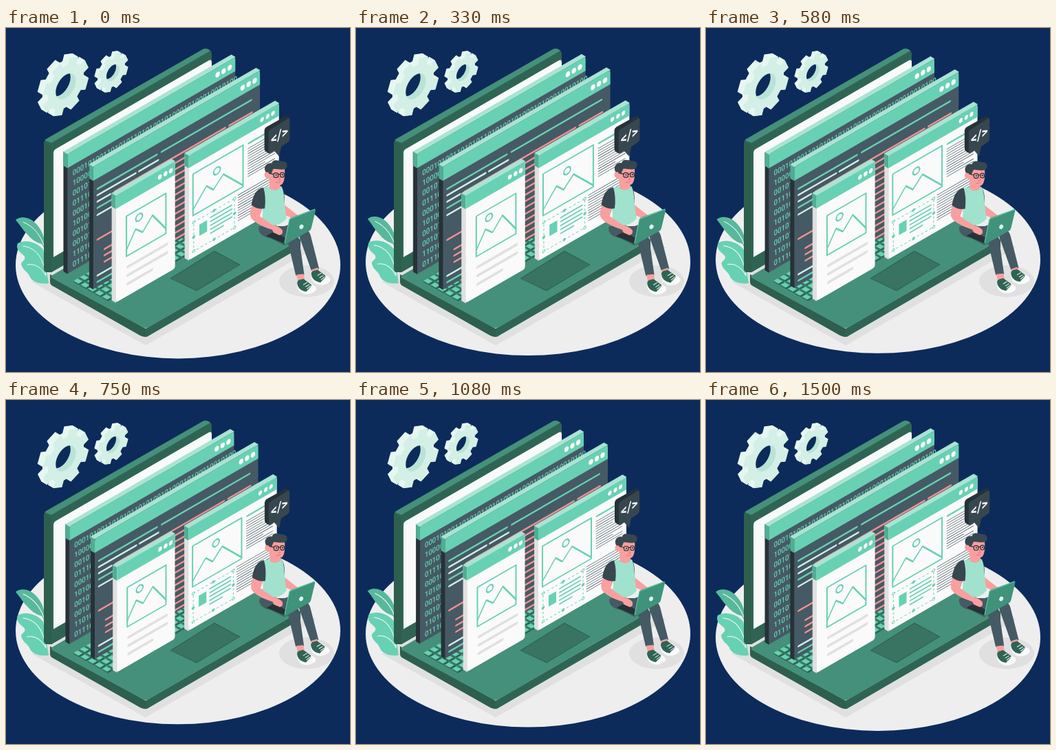
Animation, 500 px wide and 500 px high, one loop 1.54 s. Source, as an HTML page with a canvas:

```html
<!DOCTYPE html>
<html lang="en">
<head>
<meta charset="utf-8">
<title>Developer workspace</title>
<style>
html, body { margin: 0; width: 100%; height: 100%; overflow: hidden; background: #0c2b5b; }
canvas { display: block; width: 100vmin; height: 100vmin; }
</style>
</head>
<body>
<canvas id="stage"></canvas>
<script>
const canvas = document.getElementById('stage');
const ctx = canvas.getContext('2d');
const density = Math.max(1, window.devicePixelRatio || 1);
canvas.width = canvas.height = 500 * density;

const LOOP = 1540;
const SLOPE = 0.577;
const NAVY = '#0c2b5b', MINT = '#68d1b3', PALE = '#a9e4d3', WHITE = '#fafafa';
const SLATE = '#455a64', DARK = '#37474f', INK = '#263238', PINK = '#f4918f', SKIN = '#f99f9f';
const GREEN = '#45907a', GREEN_MID = '#397462', GREEN_DARK = '#2f6454', GREEN_DEEP = '#2d5e4e';
const GREY = '#e0e0e0';

// [time, scale] of the double beat shared by windows, person and bubble
const BEAT = [[0, 1.024], [100, 1.03], [190, 1.09], [260, 1.03], [330, 1.028], [580, 1.01],
  [880, 1], [970, 1.08], [1050, 1], [1250, 1], [1500, 1.01], [LOOP, 1.024]];

function beatAt(t) {
  const i = BEAT.findIndex(([time]) => time > t);
  const [t0, a] = BEAT[i - 1], [t1, b] = BEAT[i];
  return a + (b - a) * (t - t0) / (t1 - t0);
}

function poly(color, ...pts) {
  ctx.beginPath();
  pts.forEach(([x, y]) => ctx.lineTo(x, y));
  ctx.closePath();
  ctx.fillStyle = ctx.strokeStyle = color;
  ctx.lineWidth = 0.8;
  ctx.lineJoin = 'round';
  ctx.fill();
  ctx.stroke();
}

function shape(color, d) {
  ctx.fillStyle = color;
  ctx.fill(new Path2D(d));
}

function stroke(color, width, d) {
  ctx.strokeStyle = color;
  ctx.lineWidth = width;
  ctx.lineCap = ctx.lineJoin = 'round';
  ctx.stroke(new Path2D(d));
}

function oval(color, x, y, rx, ry, turn = 0) {
  ctx.beginPath();
  ctx.ellipse(x, y, rx, ry, turn, 0, Math.PI * 2);
  ctx.fillStyle = color;
  ctx.fill();
}

function bar(color, width, u0, u1, v) {
  stroke(color, width, `M${u0} ${v}H${u1}`);
}

function scaled(x, y, s, draw) {
  ctx.save();
  ctx.translate(x, y);
  ctx.scale(s, s);
  ctx.translate(-x, -y);
  draw();
  ctx.restore();
}

function drawFloor(t) {
  const phase = ((t + 45) % LOOP) / LOOP;
  const lift = 10 * (1 - Math.abs(2 * phase - 1));
  oval('#eeeeee', 250, 345 - lift, 236, 136);
  poly(GREY, [38, 369], [203, 461], [450, 319], [290, 229]);
  oval(GREY, 437, 368, 40, 23);
}

function drawPlant(t) {
  const sway = (1 - Math.cos(4 * Math.PI * t / LOOP)) / 2;
  ctx.save();
  ctx.translate(60, 365);
  ctx.rotate(sway * 0.035);
  ctx.translate(-60, -365);
  shape('#58b89c', 'M14 279C22 272 36 275 45 286C53 295 57 306 58 324L52 314C42 311 36 306 31 300C24 293 21 287 14 279Z');
  stroke(WHITE, 1, 'M25 282C41 289 51 301 57 322');
  shape(MINT, 'M17 313C27 307 44 310 54 322L62 371C49 373 37 369 34 360C31 354 24 352 22 343C23 338 29 338 27 332C23 327 13 323 17 313Z');
  stroke(WHITE, 1, 'M25 317C43 319 54 333 58 359M31 344C43 342 51 348 58 360');
  ctx.restore();
}

function gearPath(x, y, r) {
  ctx.beginPath();
  for (let k = 0; k < 8; k++) {
    const mid = (24 + 45 * k) * Math.PI / 180;
    [[-0.25, 0.78], [-0.2, 1], [0.2, 1], [0.25, 0.78]].forEach(([da, f]) => {
      const c = Math.cos(mid + da), s = Math.sin(mid + da);
      ctx.lineTo(x + 0.866 * r * f * c, y - r * f * (s + 0.5 * c));
    });
  }
  ctx.closePath();
}

function ringPath(x, y, r) {
  ctx.beginPath();
  for (let i = 0; i < 48; i++) {
    const a = i * Math.PI / 24;
    ctx.lineTo(x + 0.866 * r * Math.cos(a), y - r * (Math.sin(a) + 0.5 * Math.cos(a)));
  }
  ctx.closePath();
}

function drawGear(x, y, r, hole, depth) {
  for (let d = depth; d >= 0; d -= 0.5) {
    gearPath(x - d, y - d * 0.6, r);
    ctx.fillStyle = d ? '#e6f7f2' : '#d3efe6';
    ctx.fill();
  }
  ctx.save();
  ringPath(x, y, hole);
  ctx.clip();
  ctx.fillStyle = '#b9e3d7';
  ctx.fill();
  ringPath(x - depth, y - depth * 0.6, hole);
  ctx.fillStyle = NAVY;
  ctx.fill();
  ctx.restore();
}

function drawComputer() {
  // lid
  shape(GREEN_DARK, 'M55 170Q55 163 60 160L286 31Q291 28 296 32Q299 34 299 39V220L66 355L58 355Q55 353 55 349Z');
  shape(GREEN, 'M56 163L286 31Q291 28 297 33L66 167Z');
  shape(GREEN_DARK, 'M66 169L299 36V220L66 355Z');
  shape(GREEN_DEEP, 'M55 165L64 170Q66 171 66 174V355L57 354Q55 352 55 348Z');
  shape('#f8faf9', 'M69 182Q69 178 72 176L295 47Q299 45 299 50V200L69 333Z');

  // base
  shape(GREEN_DEEP, 'M64 358L203 437V449Q199 449 195 447L68 375Q64 373 64 369Z');
  shape(GREEN_DARK, 'M203 437L428 307V319L208 447Q206 449 203 449Z');
  shape(GREEN, 'M66 360L290 229L428 307L209 434Q203 438 197 434L66 363Z');

  const at = (a, b) => [64 + 139 * a + 225 * b, 360 + 77 * a - 130 * b];
  for (let row = 0; row < 5; row++) {
    for (let col = 0; col < 22; col++) {
      const a = 0.18 + row * 0.075, b = 0.04 + col * 0.04;
      poly(GREEN_DARK, at(a, b), at(a + 0.062, b), at(a + 0.062, b + 0.033), at(a, b + 0.033));
      poly(MINT, at(a - 0.004, b + 0.006), at(a + 0.043, b + 0.006), at(a + 0.043, b + 0.03), at(a - 0.004, b + 0.03));
    }
  }
  poly(GREEN_DARK, [239, 364], [303, 324], [340, 344], [277, 382]);
  poly(GREEN_MID, [241, 364.3], [303, 325.6], [338, 344.3], [277, 380.4]);
}

function drawWindow({ x, y, w, h, head, body, side, dots, content }) {
  const dx = -5.5, dy = -3.3, rise = w * SLOPE;
  poly(side, [x + dx, y + dy], [x, y], [x, y + h], [x + dx, y + h + dy]);
  poly('#4fae93', [x + dx, y + dy], [x, y], [x, y + head], [x + dx, y + head + dy]);
  poly(PALE, [x + dx, y + dy], [x + w + dx, y - rise + dy], [x + w, y - rise], [x, y]);

  ctx.save();
  ctx.transform(1, -SLOPE, 0, 1, x, y);
  ctx.fillStyle = body;
  ctx.beginPath();
  ctx.roundRect(0, 0, w, h, 3);
  ctx.fill();
  ctx.fillStyle = MINT;
  ctx.beginPath();
  ctx.roundRect(0, 0, w, head, [3, 3, 0, 0]);
  ctx.fill();
  dots.u.forEach(u => oval(WHITE, u, head / 2 + 0.3, dots.r, dots.r * 1.2));
  content();
  ctx.restore();
}

function picture(u, v, w, h, sun, hills) {
  ctx.strokeStyle = MINT;
  ctx.lineWidth = 2;
  ctx.strokeRect(u, v, w, h);
  ctx.beginPath();
  ctx.arc(sun[0], sun[1], 4.8, 0, Math.PI * 2);
  ctx.stroke();
  stroke(MINT, 2, 'M' + hills.map(p => p.join(' ')).join('L'));
}

function binaryContent() {
  const rows = ['0001010011010101101010010100010100010010100111010101', '10000101', '00101001',
    '01110100', '00010110', '10100101', '00101101', '00101001', '11010010', '01110101'];
  ctx.save();
  ctx.scale(0.87, 1);
  ctx.font = '500 11px Roboto, "Liberation Sans", sans-serif';
  ctx.textBaseline = 'middle';
  ctx.fillStyle = MINT;
  rows.forEach((row, i) => ctx.fillText(row.slice(0, 43), 8, 32 + i * 14.4));
  ctx.restore();
}

function codeContent() {
  const pale = '#d3f0e8';
  const lines = [
    [35, 6, 90, MINT], [35, 97, 224, MINT], [44, 6, 60, pale], [44, 65, 92, pale],
    [53, 6, 24, pale], [53, 30, 187, PINK], [53, 193, 225, PINK], [62, 6, 40, MINT],
    [72, 6, 40, pale], [107, 6, 40, PINK], [126, 16, 40, PINK], [135, 16, 40, PINK],
    [144, 16, 40, PINK], [158, 6, 40, pale], [167, 6, 40, MINT]];
  lines.forEach(([v, u0, u1, color]) => bar(color, 2.7, u0, u1, v));
  for (let v = 62; v < 172; v += 9) bar(PINK, 2.7, 105, 150, v);
}

function cardContent() {
  picture(15, 38, 56, 57, [33, 50], [[15, 86], [28, 64], [38, 74], [52, 58], [71, 88]]);
  bar(GREY, 4, 17, 72, 111);
  bar(GREY, 4, 17, 72, 123);
  bar(GREY, 4, 17, 51, 135);
}

function pageContent() {
  picture(6, 30, 71, 59, [40, 45], [[6, 81], [25, 58], [35, 69], [49, 55], [77, 87]]);
  bar(MINT, 2.6, 85, 110, 32);
  for (let i = 0; i < 12; i++) bar(SLATE, 0.8, 84, i % 5 === 4 ? 108 : 122, 39 + i * 3.6);
  for (let i = 0; i < 11; i++) bar(SLATE, 0.8, 70, i % 6 === 5 ? 92 : 122, 97 + i * 3.6);
  ctx.setLineDash([3, 3]);
  ctx.lineWidth = 1;
  ctx.lineCap = 'butt';
  ctx.strokeStyle = MINT;
  ctx.strokeRect(7, 99, 58, 41);
  ctx.setLineDash([]);
  [[7, 99], [65, 99], [7, 140], [65, 140], [36, 99], [36, 140], [7, 120], [65, 120]].forEach(([u, v], i) => {
    oval(MINT, u, v, 2.2, 2.2);
    if (i < 4) oval(WHITE, u, v, 1.2, 1.2);
  });
  ctx.fillStyle = MINT;
  ctx.fillRect(15, 107, 11, 16);
  for (let i = 0; i < 5; i++) bar(MINT, 1.9, 31, i === 4 ? 49 : 61, 106 + i * 5.6);
}

const WINDOWS = [
  { x: 93, y: 184, w: 238, h: 170, head: 20, body: SLATE, side: INK,
    dots: { u: [213, 221.5, 230], r: 3.2 }, content: binaryContent },
  { x: 129.5, y: 202, w: 236.5, h: 174, head: 20, body: SLATE, side: INK,
    dots: { u: [212, 220.5, 229], r: 3.2 }, content: codeContent },
  { x: 265, y: 186, w: 128, h: 149, head: 18, body: WHITE, side: GREY,
    dots: { u: [104, 112, 119.5], r: 2.7 }, content: pageContent },
  { x: 161.5, y: 243, w: 84, h: 152, head: 19, body: WHITE, side: GREY,
    dots: { u: [62.5, 70.5, 78], r: 2.8 }, content: cardContent }
];

function drawShoe(x, y) {
  ctx.save();
  ctx.translate(x, y);
  shape(WHITE, 'M0 7C-1 14 3 19 9 21C15 23 25 20 27 15C28 10 20 8 15 4Z');
  shape(GREEN_DARK, 'M0 5C1 1 4 1 9 0L20 8C21 11 17 13 13 18C5 17 0 12 0 5Z');
  stroke(WHITE, 1, 'M9 8L14 5M12 11L17 8M14 14L19 10');
  ctx.restore();
}

function drawPerson() {
  // legs
  shape(SLATE, 'M369 288C366 297 374 304 386 305L409 307L421 358Q428 361 433 357L426 308Q424 296 408 288Z');
  shape(SLATE, 'M400 290L426 303L443 351Q448 353 454 348L442 301Q437 287 416 284Z');
  stroke(DARK, 0.8, 'M425 308Q420 300 406 298');
  shape(SKIN, 'M422 357L424 367L434 365L432 356Z');
  shape(SKIN, 'M443 350L446 358L455 355L452 347Z');
  drawShoe(423, 363);
  drawShoe(443, 350);

  // torso and arms
  shape(SKIN, 'M400 254L423 272Q429 277 424 280L400 270Z');
  shape(DARK, 'M399 231Q406 235 405 258L398 257Z');
  shape('#a0e2cd', 'M374 234Q391 229 401 232C406 243 404 259 408 277Q397 291 373 286C374 269 374 252 374 234Z');
  shape(SKIN, 'M361 253C358 262 355 268 357 275C361 283 375 289 387 293Q398 303 402 297C403 291 394 288 388 286L370 274L377 253Z');
  shape(DARK, 'M375 233C365 235 360 244 358 258Q367 265 377 263Q379 246 375 233Z');

  // head
  shape(SKIN, 'M383 218L384 235Q393 240 399 233V227Z');
  shape(SKIN, 'M382 204C388 201 402 200 405 206C406 215 405 226 401 229C394 232 384 228 382 219Z');
  oval(SKIN, 380.5, 215, 4, 5);
  shape(DARK, 'M378 211C374 203 381 197 387 199C388 192 397 195 401 196C409 195 411 203 406 207C399 209 393 206 389 207L386 214L382 212Z');
  ctx.strokeStyle = INK;
  ctx.lineWidth = 1.2;
  ctx.beginPath();
  ctx.roundRect(389.5, 212.5, 6.5, 6.5, 2.5);
  ctx.roundRect(399, 212, 5.5, 6.5, 2.5);
  ctx.stroke();
  stroke(INK, 1.2, 'M383 213L389.5 214.5M396 214.5H399');
  oval(INK, 393, 215.5, 0.9, 1.2);
  oval(INK, 402, 215, 0.9, 1.2);
  stroke('#d86f73', 0.9, 'M397 218L399 222L396 223M393 226Q396 228 399 225');

  // portable computer
  shape(INK, 'M379 302L391 295L408 306L405 315Z');
  shape(GREEN_MID, 'M379 302L405 313L412 279L414 278L411 314H404Z');
  shape('#3f937b', 'M412 279Q412 277 414 276L447 264Q449 263 449 266L443 291Q442 294 440 295L408 313Q405 314 405 311Z');
  stroke(MINT, 1, 'M405 312L412 278L448 264');
  oval('#ddf5ee', 429, 289, 2.8, 3.4, 0.5);
  shape(SKIN, 'M387 289Q395 286 402 294Q403 300 398 301L389 297Z');
}

function drawBubble() {
  shape(INK, 'M376 149Q376 146 379 144L406 129Q409 128 412 131L383 151V182L378 179Q376 178 376 175Z');
  shape(DARK, 'M382 152Q382 150 384 148L408 133Q412 130 412 135V161Q412 164 409 166L400 172L397 186L390 178L385 181Q382 183 382 179Z');
  ctx.save();
  ctx.transform(0.87, -0.5, 0, 1, 397.3, 156.5);
  ctx.font = '700 20px Roboto, "Liberation Sans", sans-serif';
  ctx.textAlign = 'center';
  ctx.textBaseline = 'middle';
  ctx.fillStyle = WHITE;
  ctx.fillText('</>', 0, 0);
  ctx.restore();
}

function render() {
  const t = performance.now() % LOOP;
  const beat = beatAt(t);
  ctx.setTransform(density, 0, 0, density, 0, 0);
  ctx.fillStyle = NAVY;
  ctx.fillRect(0, 0, 500, 500);
  drawFloor(t);
  drawPlant(t);
  drawGear(87, 85, 39, 17, 8);
  drawGear(155.5, 65, 26, 11, 5);
  drawComputer();
  scaled(237, 225, beat, () => WINDOWS.forEach(drawWindow));
  scaled(394, 155, beat, drawBubble);
  scaled(412, 290, beat, drawPerson);
  requestAnimationFrame(render);
}
render();
</script>
</body>
</html>
```
